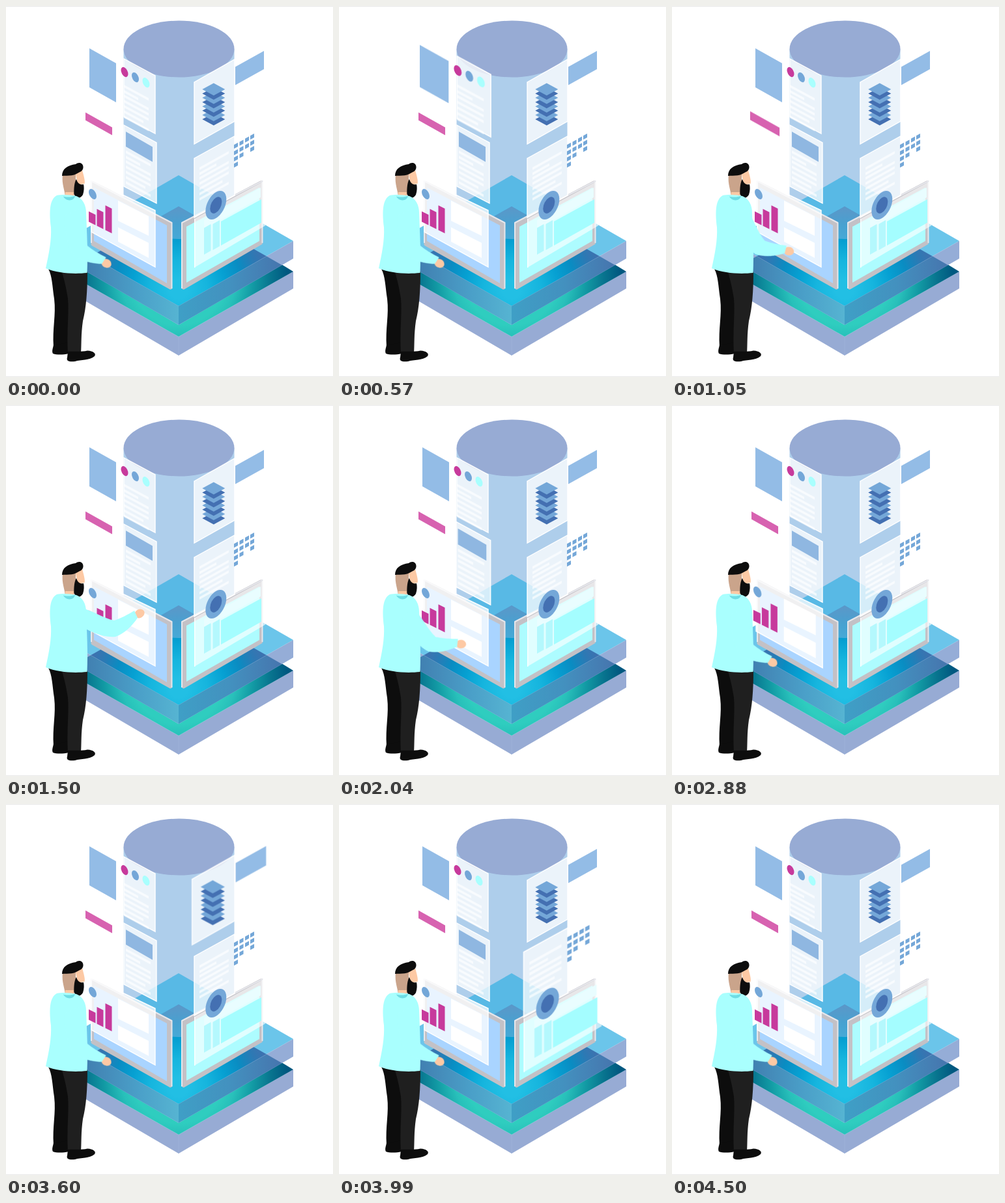
An HTML page without scripts that plays this animation: 502 px wide and 570 px high, repeating every 4530 ms.

```html
<!DOCTYPE html>
<html lang="en">
<head>
<meta charset="utf-8">
<title>Data platform</title>
<style>
html, body { margin: 0; width: 100%; height: 100%; overflow: hidden; background: #fff; }
svg { display: block; width: 502px; height: 570px; }
.pulse { --s: 1.1; animation: pulse 4.53s ease-in-out infinite; }
.news { transform-origin: 178.5px 131px; animation-delay: 0s; }
.tag { transform-origin: 142.5px 181px; animation-delay: -3.78s; }
.page { --s: 1.07; transform-origin: 206px 243px; animation-delay: -3.03s; }
.chart { transform-origin: 178.5px 335px; animation-delay: -2.28s; }
.stack { transform-origin: 342.5px 140.5px; animation-delay: -1.53s; }
.report { transform-origin: 345px 300px; animation-delay: -.78s; }
.arm { transform-origin: 112px 312px; animation: reach 4.53s ease-in-out infinite; }
.glass { fill: #fff; fill-opacity: .75; stroke: #fff; stroke-width: 1.4; }
.rows { fill: none; stroke: #fff; stroke-width: 4; opacity: .65; }
.side { fill: #97abd4; }
.sky { fill: #93bce6; }
.blue { fill: #74a7d8; }
.navy { fill: #4470b2; }
.pink { fill: #c73a9c; }
.aqua { fill: #a9fffe; }
.skin { fill: #fdc9a4; }
.ink { fill: #0d0d0d; }
@keyframes pulse {
  0%, 16.5%, 100% { transform: scale(1); }
  5.9%, 10.8% { transform: scale(var(--s)); }
}
@keyframes reach {
  0%, 16.56%, 53%, 100% { transform: rotate(58deg); }
  33.1%, 36.4% { transform: rotate(0deg); }
}
</style>
</head>
<body>
<svg viewBox="0 0 502 570">
  <defs>
    <radialGradient id="deep" gradientUnits="userSpaceOnUse" cx="265" cy="420" r="176">
      <stop offset=".4" stop-color="#2fcdbf"/>
      <stop offset=".5" stop-color="#28c0ba"/>
      <stop offset=".65" stop-color="#129aa4"/>
      <stop offset=".8" stop-color="#08758f"/>
      <stop offset=".95" stop-color="#005880"/>
    </radialGradient>
    <radialGradient id="pool" gradientUnits="userSpaceOnUse" cx="265" cy="435" r="145">
      <stop offset=".1" stop-color="#22bfe4"/>
      <stop offset=".3" stop-color="#16b5de"/>
      <stop offset=".5" stop-color="#06a0d2"/>
      <stop offset=".68" stop-color="#0a8cc2"/>
      <stop offset=".85" stop-color="#2d79b4"/>
      <stop offset="1" stop-color="#4270ae"/>
    </radialGradient>
    <linearGradient id="edge" gradientUnits="userSpaceOnUse" x1="107" x2="423" y1="0" y2="0">
      <stop offset="0" stop-color="#3f79ac"/>
      <stop offset=".3" stop-color="#4a9fc8"/>
      <stop offset=".5" stop-color="#56b4d2"/>
      <stop offset=".5" stop-color="#3f9fc6"/>
      <stop offset=".75" stop-color="#4391bf"/>
      <stop offset="1" stop-color="#4675ae"/>
    </linearGradient>
    <clipPath id="core"><path d="M265 308L400 384.6 265 461 130 384.6z"/></clipPath>
    <path id="lines" d="M0 0h38M0 8h22M0 15h38M0 23h38M0 31h38M0 39h30M0 47h38"/>
    <path id="tile" d="M0 0h37v0L18.5 9.5z"/>
    <path id="slab" d="M-17.5 0L0-9.5 17.5 0 0 9.5z"/>
    <path id="cell" d="M0 3.2L6 0v6L0 9.2z"/>
  </defs>

  <rect width="502" height="570" fill="#fff"/>
  <path d="M0 .5H502M0 569.5H502" stroke="#e8e8e8"/>

  <!-- lower slab -->
  <path class="side" d="M89 408L265 508 441 408V434L265 537 89 434z"/>
  <path d="M265 508V537" stroke="#a3b5da" stroke-width=".6"/>
  <path fill="url(#deep)" d="M89 408L107 397 265 490 423 397 441 408 265 508z"/>

  <!-- column and upper slab -->
  <path fill="#aeceeb" d="M180.500 66V315A85 43 0 0 0 350.500 315V66z"/>
  <path fill="#3fb4e4" fill-opacity=".77" d="M265 260L441 361 265 461 89 361z"/>
  <path fill="url(#pool)" d="M265 308L400 384.600 265 461 130 384.600z"/>
  <g clip-path="url(#core)">
    <path fill="#86b7df" fill-opacity=".5" d="M180.500 300V315A85 43 0 0 0 350.500 315V300z"/>
  </g>
  <path fill="#95add7" d="M89 361L265 461 441 361V388L265 490 89 388z"/>
  <path fill="url(#edge)" d="M130 384.600L265 461 400 384.600 423.500 398 265 490 106.500 398z"/>
  <ellipse class="side" cx="265.500" cy="66" rx="85" ry="43.500"/>

  <g class="pulse news">
    <path class="sky" d="M128 65L169 88V148L128 125z"/>
    <path class="glass" d="M181 81L229 107V196L181 170z"/>
    <g transform="matrix(1 .54 0 1 181 123)"><use href="#lines" class="rows"/></g>
    <g transform="matrix(1 .55 0 1 182 101.500)">
      <ellipse class="pink" rx="5.500" ry="7"/>
      <ellipse class="blue" cx="16.500" cy="-1" rx="5.500" ry="7"/>
      <ellipse class="aqua" cx="33" cy="-2" rx="5.500" ry="7"/>
    </g>
  </g>

  <g class="pulse tag"><path fill="#d762b0" d="M122 163.500L163 186.500V198.500L122 175.500z"/></g>

  <g class="pulse page">
    <path class="glass" d="M181 183L231 210V303L181 277z"/>
    <path fill="#8fb7e1" d="M184 193L225 216.500V239.500L184 216z"/>
    <g transform="matrix(1 .54 0 1 184 224)"><use href="#lines" class="rows"/></g>
  </g>

  <g class="pulse stack">
    <path class="sky" d="M352 93.500L396 69V97L352 121.500z"/>
    <path class="glass" d="M289 117L351 82V177L289 212z"/>
    <g transform="translate(318.800 128)">
      <use href="#slab" class="navy" y="46"/>
      <use href="#slab" class="blue" y="39.400"/>
      <use href="#slab" class="navy" y="32.800"/>
      <use href="#slab" class="blue" y="26.300"/>
      <use href="#slab" class="navy" y="19.700"/>
      <use href="#slab" class="blue" y="13.100"/>
      <use href="#slab" class="navy" y="6.600"/>
      <use href="#slab" class="blue"/>
    </g>
  </g>

  <!-- screens -->
  <g stroke-linejoin="round" stroke-width="5">
    <path fill="#c3c1c6" stroke="#c3c1c6" d="M133 271L252.500 334V433L133 366z"/>
    <path fill="none" stroke="#e6e7ec" stroke-width="2" d="M131 364V269L254.500 333V434"/>
    <path fill="#a9d4ff" d="M135 279L247 337V426L135 361z"/>
    <path fill="#c3c1c6" stroke="#c3c1c6" d="M272.500 334L391.500 271V364L272.500 433z"/>
    <path fill="none" stroke="#e6e7ec" stroke-width="2" d="M270 434V333L393.500 269V364"/>
    <path fill="#adfcff" d="M277 339L389 279V361L277 425z"/>
  </g>

  <g class="pulse chart">
    <path class="glass" fill-opacity=".6" d="M131 267L229 314V401L131 347z"/>
    <path fill="#fff" d="M172 299L219 323V353L172 330zM172 340L219 364V387L172 362z"/>
    <g transform="matrix(1 .5 0 1 127 331.500)">
      <path class="pink" d="M0 0V-16H10.500V0zM12.500 0V-26H22.500V0zM25.500 0V-38H35.500V0z"/>
    </g>
    <g transform="matrix(1 .55 0 1 133 289)"><ellipse class="blue" rx="6" ry="7.300"/></g>
  </g>

  <g class="pulse report">
    <path class="glass" d="M289 234L351 200V291L289 325z"/>
    <g transform="matrix(1.180 -.66 0 1 297 250)"><use href="#lines" class="rows"/></g>
    <g class="blue">
      <use href="#cell" x="350" y="210"/><use href="#cell" x="350" y="220"/>
      <use href="#cell" x="350" y="229.500"/><use href="#cell" x="350" y="239"/>
      <use href="#cell" x="358.500" y="205.500"/><use href="#cell" x="358.500" y="215"/>
      <use href="#cell" x="358.500" y="224.500"/>
      <use href="#cell" x="367" y="200.500"/><use href="#cell" x="367" y="210.500"/>
      <use href="#cell" x="375" y="196"/><use href="#cell" x="375" y="205.500"/>
      <use href="#cell" x="375" y="215"/>
    </g>
    <path fill="#fff" fill-opacity=".62" d="M289 327L398 268V337.500L289 402z"/>
    <path fill="#e9fdff" d="M304 329L391 279V294L304 343z"/>
    <path fill="#a4fdff" d="M330 331L392 297V333L330 368z"/>
    <path fill="#b4f8fd" d="M304 341L314.500 335V376L304 382zM317.500 335L328 329V369L317.500 375z"/>
    <path fill="none" stroke="#fff" stroke-width="1.300" d="M289.700 327V402"/>
    <g transform="matrix(1 -.58 0 1 322.300 306)">
      <ellipse class="blue" rx="16" ry="20"/>
      <ellipse class="navy" rx="9" ry="11.500"/>
    </g>
  </g>

  <!-- person -->
  <path class="ink" d="M65 404L98 409 97 520 73 524C71 495 77 475 74 450 71 430 71 415 65 404z"/>
  <path class="ink" d="M73 521L96 517V534C88 536 77 536 72 534 70 530 72 526 73 521z"/>
  <path fill="#1f1f1f" d="M86 409L125 408C125 440 123 464 118 484 115 505 116 520 115 534H95C93 500 97 472 95 450 92 430 89 420 86 409z"/>
  <path class="ink" d="M95 531C104 530 114 532 125 529.500 134 530 139 534 136 538 128 545 115 543 106 546 98 547 92 546 94 540z"/>
  <path fill="#caa48b" d="M87 259L107 258V282L103 295H91C91 284 85 274 87 259z"/>
  <path class="skin" d="M107 258L117 252C119 260 122 269 120.500 273L110 275z"/>
  <path class="skin" d="M91 286L104 286 103 296H91z"/>
  <path class="ink" d="M108 266C105 270 104 281 104.500 289 107 296 114 297 118 290 120 284 120 278 119 274 114 275 110 273 108 266z"/>
  <path class="ink" d="M86 261C86 250 95 244.500 107 243 111 239.500 118 240.500 118.500 247 119 254 113 255 108 258 101 262 93 260 86 261z"/>
  <path class="aqua" d="M78 291C86 289 100 290 108 292 118 296 123 306 123 318 124 345 126 380 124.500 410 105 412 80 411 61 403 66 380 70 360 69 340 66 315 67 297 78 291z"/>
  <path fill="#6fdde4" d="M88 292.500C93 294 101 294 106 291.500 105 300 92 301 88 292.500z"/>
  <g class="arm">
    <ellipse class="skin" cx="205" cy="320.500" rx="8" ry="6.500" transform="rotate(-30 205 320.500)"/>
    <path class="aqua" d="M112 311C130 314 150 328 166 331 176 328 187 322 197 316L202 327C195 338 181 352 168 356 150 358 128 348 108 336z"/>
  </g>
</svg>
</body>
</html>
```
